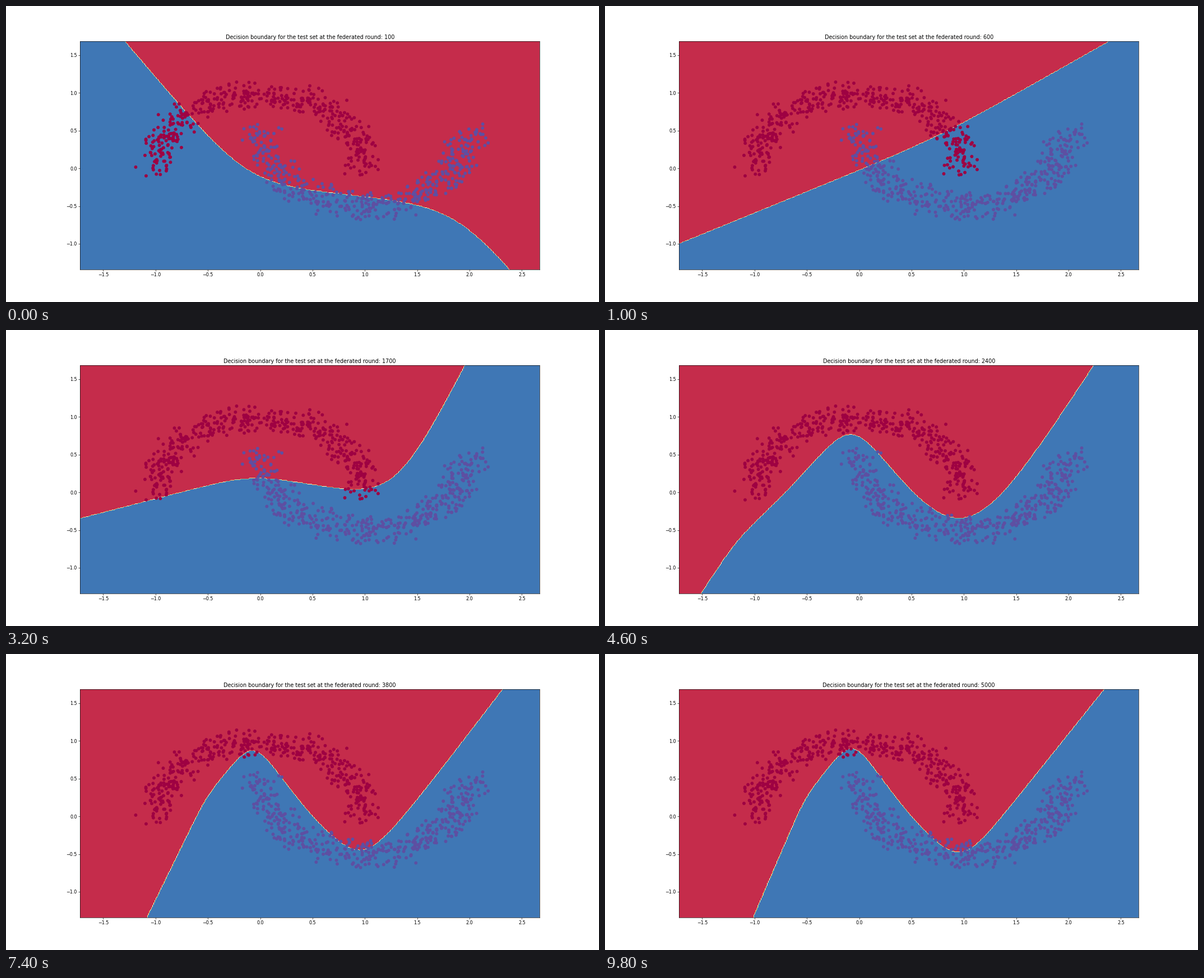
Animation of 1058x529 px, one loop 10 s. Source, as a matplotlib script:

```python
import numpy as np
import matplotlib.pyplot as plt
from matplotlib.animation import FuncAnimation

FRAMES = 50
STEP = 0.01
X_RANGE = (-1.72, 2.68)
Y_RANGE = (-1.34, 1.69)


def boundary(x, intercept, slope, *bends):
    """Straight line whose slope changes softly at each (place, change, width)."""
    y = intercept + slope * x
    for place, change, width in bends:
        y = y + change * width * np.logaddexp(0, (x - place) / width)
    return y


def half_moon(rng, count=500, noise=0.1):
    """Noisy upper half circle."""
    t = np.linspace(0, np.pi, count)
    shift = rng.normal(0, noise, (count, 2))
    points = np.column_stack([np.cos(t), np.sin(t)]) + shift
    keep = (np.hypot(*shift.T) < 0.23) & (points[:, 1] > -0.12)
    return points[keep]


grid_x, grid_y = np.meshgrid(np.arange(*X_RANGE, STEP),
                             np.arange(*Y_RANGE, STEP))
xs = grid_x[0]

# Training round, easing power on the way there, boundary learned by then
STAGES = [
    (100, 1, boundary(xs, -0.43, -1.63, (-0.13, 1.49, 0.2), (1.92, -1.6, 0.22))),
    (600, 1, boundary(xs, -0.03, 0.565, (0.75, 0.22, 0.25))),
    (1700, 1, boundary(xs, 0.27, 0.36, (-0.08, -0.61, 0.14), (1.3, 2.95, 0.165))),
    (2400, 1, boundary(xs, 1.826, 2.1, (-1.18, -0.75, 0.06), (-0.65, 0.2, 0.06),
                       (-0.07, -3.4, 0.09), (0.985, 3.97, 0.235))),
    (5000, 2, boundary(xs, 1.912, 3.22, (-0.52, -1.42, 0.04), (-0.07, -3.75, 0.06),
                       (0.45, 0.55, 0.1), (0.97, 3.13, 0.1))),
]


def boundary_at(round_no):
    """Blend the two stages around the given round."""
    for (r0, _, y0), (r1, power, y1) in zip(STAGES, STAGES[1:]):
        if round_no <= r1:
            break
    blend = 1 - (1 - (round_no - r0) / (r1 - r0)) ** power
    return y0 + (y1 - y0) * blend


rng = np.random.default_rng(7)
upper = half_moon(rng)
lower = [1, 0.5] - half_moon(rng)
points = np.vstack([upper, lower])
labels = np.repeat([0, 1], [len(upper), len(lower)])

fig, ax = plt.subplots(figsize=(18.4, 9.2), dpi=57.5)


def draw(frame):
    round_no = 100 * (frame + 1)
    below = grid_y < boundary_at(round_no)
    ax.clear()
    ax.contourf(grid_x, grid_y, below.astype(float), cmap="Spectral")
    ax.scatter(*points.T, c=labels, s=40, cmap="Spectral")
    ax.set_xlim(xs[0], xs[-1])
    ax.set_ylim(grid_y[0, 0], grid_y[-1, 0])
    ax.set_title("Decision boundary for the test set at the federated round: "
                 f"{round_no}")


anim = FuncAnimation(fig, draw, frames=FRAMES, interval=200,
                     init_func=lambda: None, repeat=True, repeat_delay=0)
plt.show()
```
